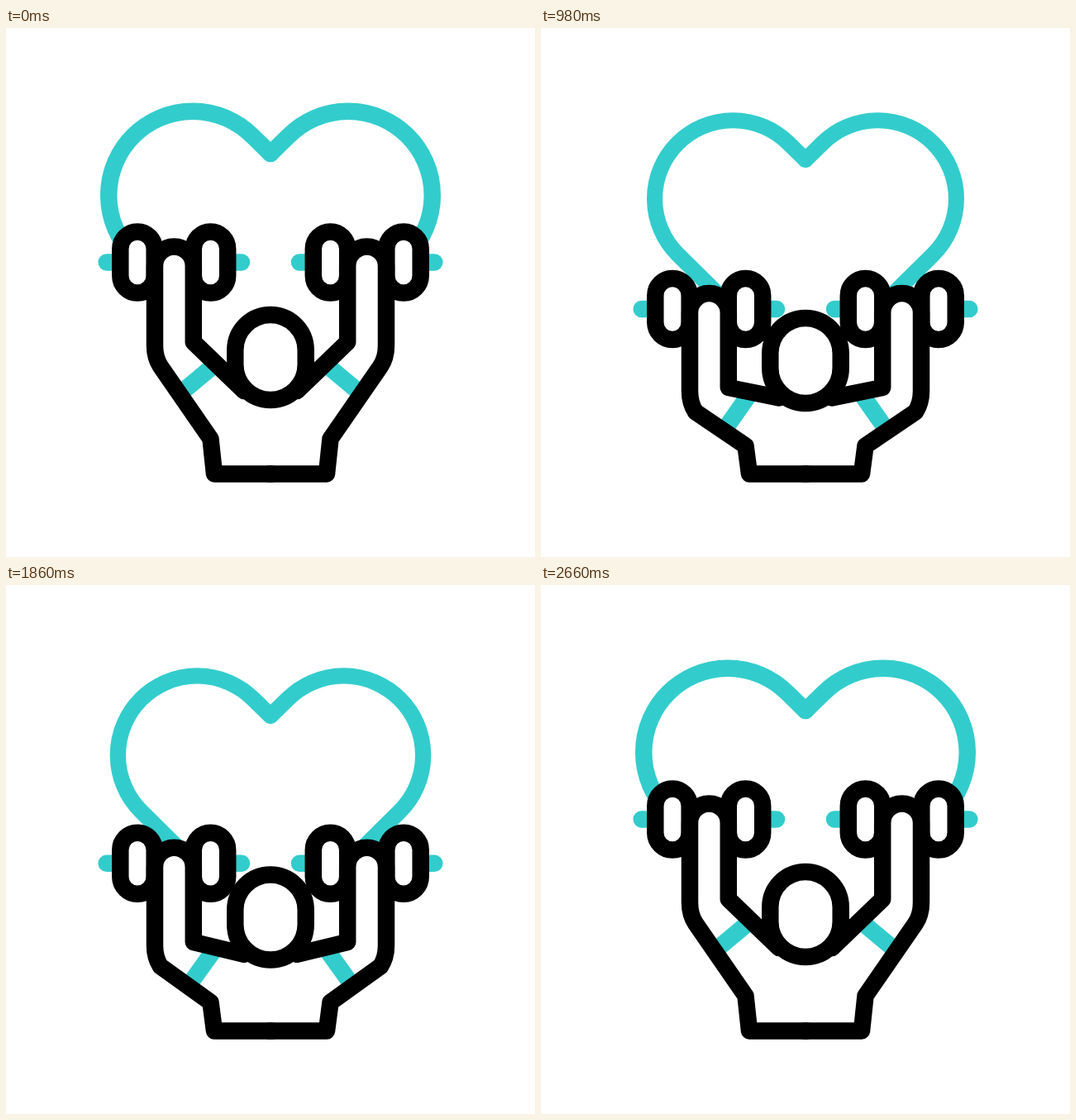
Recreate the animation shown at these times as an HTML page with a canvas. Size 640 by 640 pixels, loop 3.2 s.

```html
<!DOCTYPE html>
<html lang="en">
<head>
<meta charset="utf-8">
<title>Heart workout</title>
<style>
  html, body { margin: 0; width: 100%; height: 100%; overflow: hidden; background: #fff; }
  canvas { display: block; width: 640px; height: 640px; }
</style>
</head>
<body>
<canvas width="640" height="640"></canvas>
<script>
const ctx = document.querySelector('canvas').getContext('2d');
const LOOP = 3200, SWING = 420, WEIGHT = 20.5, TEAL = '#33cccc';

// Heights of the moving parts in each key pose.
const rest = { bar: 283.5, elbow: 380, head: 347, shoulder: 497 };
const lift = { bar: 282, elbow: 382, head: 340.7, shoulder: 495.2 };
const high = { bar: 292, elbow: 385.5, head: 340.7, shoulder: 495.2 };
const low = { bar: 340.5, elbow: 435.5, head: 351, shoulder: 505.5 };
const overshoot = { bar: 278, elbow: 376, head: 344.5, shoulder: 494 };
const routine = [rest, lift, low, high, low, overshoot, rest];

const clamp = (x, min, max) => Math.min(Math.max(x, min), max);
const ease = p => (1 - Math.cos(Math.PI * clamp(p, 0, 1))) / 2;
const mix = (a, b, p) => a + (b - a) * p;

function poseAt(t) {
  const step = clamp(t < 535 ? (t - 200) / 335 : 1 + (t - 535) / SWING, 0, 5.9999);
  const from = routine[Math.floor(step)], to = routine[Math.floor(step) + 1];
  const pose = {};
  for (const part in rest) pose[part] = mix(from[part], to[part], ease(step % 1));
  return pose;
}

// Two beats: swell, shrink, recover.
function heartScale(t) {
  if (t < 410 || t > 410 + 4 * SWING) return 1;
  const beat = (t - 410) % (2 * SWING);
  return 1 + 0.053 * ease(beat / 140) - 0.132 * ease((beat - 140) / 345)
    + 0.079 * ease((beat - 485) / 355);
}

function stroke(path, color, cap = 'round') {
  ctx.strokeStyle = color;
  ctx.lineWidth = WEIGHT;
  ctx.lineCap = cap;
  ctx.lineJoin = 'round';
  ctx.stroke(new Path2D(path));
}

function pill(cx, top, halfWidth, height) {
  ctx.beginPath();
  ctx.roundRect(cx - halfWidth, top, 2 * halfWidth, height, halfWidth);
  ctx.fillStyle = '#fff';
  ctx.fill();
  ctx.strokeStyle = '#000';
  ctx.lineWidth = WEIGHT;
  ctx.stroke();
}

// Runs a drawing of the left half for both sides.
function mirrored(draw) {
  for (const side of [1, -1]) {
    ctx.save();
    ctx.translate(320, 0);
    ctx.scale(side, 1);
    ctx.translate(-320, 0);
    draw();
    ctx.restore();
  }
}

function drawHeart(scale) {
  ctx.save();
  ctx.translate(320, 262);
  ctx.scale(scale, scale);
  ctx.translate(-320, -262);
  mirrored(() => stroke('M320 152 L298 130.5 A101.8 101.8 0 0 0 154 274.5 L206 326', TEAL));
  ctx.restore();
}

function drawArm({ bar, elbow, shoulder }) {
  const outerElbow = elbow + 29.5, neck = shoulder - 58, palm = bar + 4.4;

  stroke(`M121.7 ${bar} H285`, TEAL);

  const strapX = 210 + 0.2 * (elbow - 380);
  const strapY = mix(outerElbow, shoulder, (strapX - 187) / 60.5);
  stroke(`M${strapX} ${strapY} L254 ${mix(elbow, neck, 27 / 61)}`, TEAL, 'butt');

  for (const x of [159, 247.5]) pill(x, bar - 37, 20.7, 74);

  const hand = `V${palm} A23.4 23.4 0 0 1 226.8 ${palm} V${elbow}`;
  ctx.fillStyle = '#fff';
  ctx.fill(new Path2D(`M180 ${elbow} ${hand} Z`));
  stroke(`M322 539.5 H252 L247.5 ${shoulder} L187 ${outerElbow}
    C182 ${elbow + 22} 180 ${elbow + 13} 180 ${elbow + 4}
    ${hand} L288 ${neck}`, '#000');
}

function frame(now) {
  const t = now % LOOP;
  const pose = poseAt(t);
  ctx.fillStyle = '#fff';
  ctx.fillRect(0, 0, 640, 640);
  drawHeart(heartScale(t));
  mirrored(() => drawArm(pose));
  pill(320, pose.head, 42.7, 103);
  requestAnimationFrame(frame);
}

requestAnimationFrame(frame);
</script>
</body>
</html>
```
